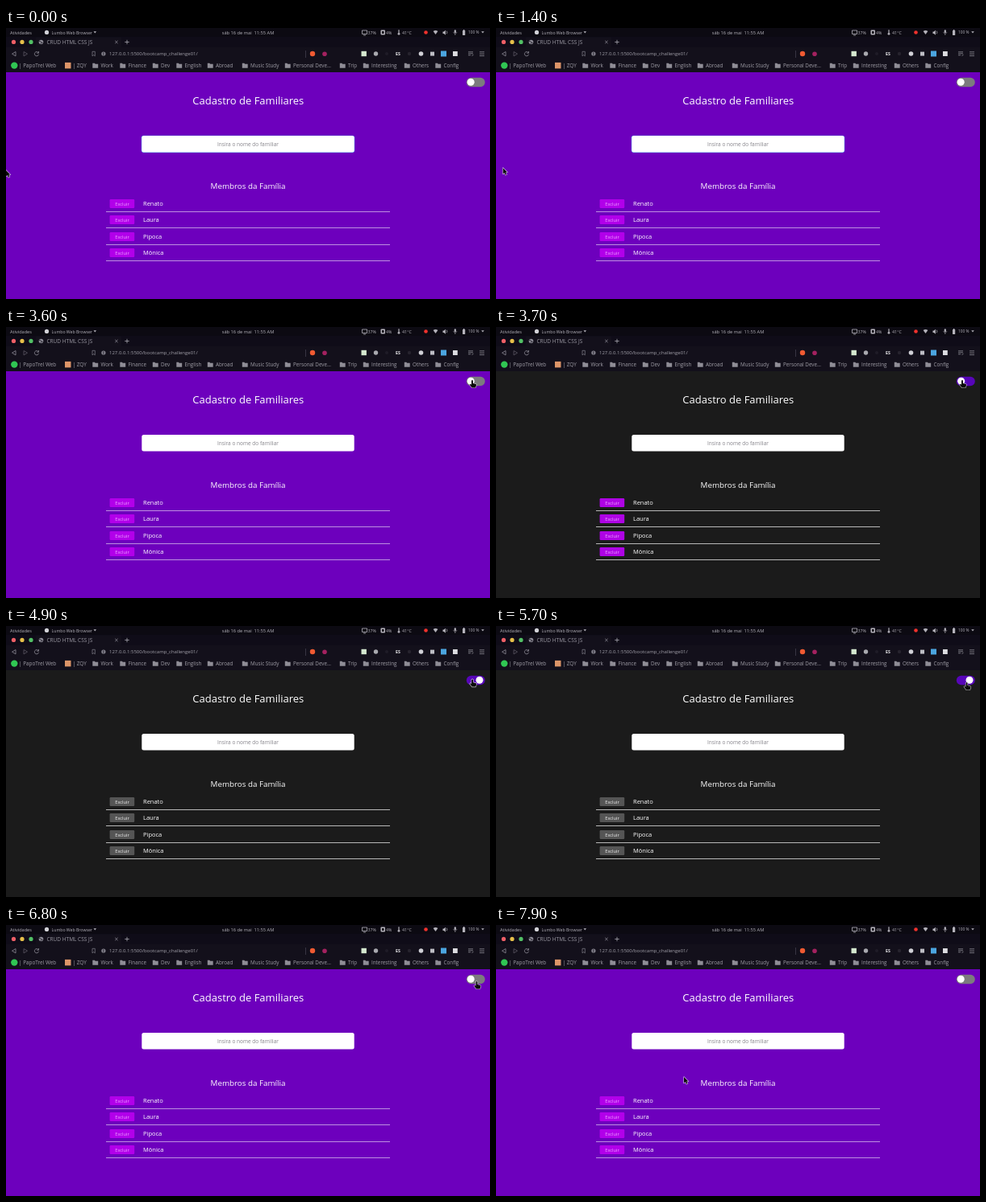
Recreate the animation shown at these times as an HTML page with a canvas. Size 600 by 337 pixels, loop 8000 ms.

```html
<!DOCTYPE html>
<html lang="pt-BR">
<head>
<meta charset="utf-8">
<title>Cadastro de Familiares</title>
<style>
html, body { margin: 0; width: 100%; height: 100%; overflow: hidden; background: #0c0a12; }
canvas { display: block; width: 600px; height: 337px; }
</style>
</head>
<body>
<canvas id="stage" width="600" height="337"></canvas>
<script>
const ctx = document.getElementById('stage').getContext('2d');
const LOOP = 8000, STEP = 100;
const DARK_FROM = 3700, DARK_TO = 6100, BLUR_AT = 3500;
const FAMILY = ['Renato', 'Laura', 'Pipoca', 'Mônica'];
const FOLDERS = [
  [108, 'Work'], [142, 'Finance'], [182.5, 'Dev'], [212, 'English'], [250.5, 'Abroad'],
  [293.5, 'Music Study'], [346.5, 'Personal Deve…'], [414.5, 'Trip'],
  [443.5, 'Interesting'], [494.5, 'Others'], [533, 'Config']
];

const linear = u => u;
const smooth = u => u * u * (3 - 2 * u);
const easeIn = u => u ** 1.5;
const easeOut = u => 1 - (1 - u) ** 1.7;
const mix = (a, b, u) => a + (b - a) * u;
const ramp = (t, from, to) => Math.min(1, Math.max(0, (t - from) / (to - from)));

// time, x, y, easing towards this point
const POINTER = [
  [0, 0, 177, linear], [1300, 0, 177, linear], [2200, 234, 95, easeIn],
  [3300, 578, 66, easeOut], [4800, 578, 66, linear], [5700, 583.5, 70, smooth],
  [7100, 583.5, 70, linear], [7900, 233, 189, smooth], [LOOP, 233, 189, linear]
];

function pointerAt(t) {
  const i = POINTER.findIndex(p => p[0] > t);
  const [t0, x0, y0] = POINTER[i - 1], [t1, x1, y1, ease] = POINTER[i];
  const u = ease(ramp(t, t0, t1));
  return [mix(x0, x1, u), mix(y0, y1, u)];
}

function text(str, x, y, size, color, { align = 'left', weight = 400 } = {}) {
  ctx.font = `${weight} ${size}px "Open Sans", sans-serif`;
  ctx.textAlign = align;
  ctx.fillStyle = color;
  ctx.fillText(str, x, y);
}

function rect(x, y, w, h, color, radius = 0) {
  ctx.fillStyle = color;
  ctx.beginPath();
  ctx.roundRect(x, y, w, h, radius);
  ctx.fill();
}

function dot(x, y, r, color) {
  ctx.fillStyle = color;
  ctx.beginPath();
  ctx.arc(x, y, r, 0, Math.PI * 2);
  ctx.fill();
}

function line(d, color = '#8f8c97', width = 0.8) {
  ctx.strokeStyle = color;
  ctx.lineWidth = width;
  ctx.stroke(new Path2D(d));
}

function shape(d, color) {
  ctx.fillStyle = color;
  ctx.fill(new Path2D(d));
}

function drawSystemBar() {
  const bar = '#0c0a12', ink = '#b5b3bb';
  rect(0, 0, 600, 11, bar);
  text('Atividades', 5, 7.5, 5.6, ink);
  dot(50.5, 5.4, 2.6, '#d2d2d8');
  text('Lumbo Web Browser', 56.5, 7.5, 5.2, ink);
  shape('M108.5 4.3h3.6l-1.8 2.3z', ink);
  text('sáb 16 de mai  11:55 AM', 300, 7.5, 5.7, ink, { align: 'center' });

  line('M441.5 3h6v4.5h-6zM443 9h3', ink);
  text('37%', 448.5, 7.5, 5.2, ink);
  rect(464.5, 2.5, 5.5, 6, ink, 1);
  rect(466, 4, 2.5, 3, bar);
  text('4%', 471, 7.5, 5.2, ink);
  line('M487 2.2v4', ink, 1.2);
  dot(487, 7.3, 1.4, ink);
  text('41°C', 491, 7.5, 5.4, ink);
  dot(520.5, 5.5, 2.3, '#f0322d');
  shape('M529.6 4q2.9-2 5.8 0l-2.9 4z', ink);
  shape('M541.5 4.4h1.4l2-1.7v6l-2-1.7h-1.4z', ink);
  line('M546.2 3.7q1.4 1.8 0 3.6', ink, 0.7);
  rect(555.7, 2.3, 2.2, 4, ink, 1.1);
  line('M554.6 5.2q2.2 4 4.4 0M556.8 7.2v1.8', ink, 0.6);
  rect(566, 3, 3.2, 6, ink, 0.5);
  rect(566.9, 2, 1.4, 1, ink);
  text('100 %', 573, 7.3, 4.8, ink);
  shape('M589.2 4.3h3.6l-1.8 2.3z', ink);
}

function drawTabs() {
  rect(0, 11, 600, 13, '#0f0c18');
  rect(37, 11.5, 106, 13, '#13101b', 1);
  dot(9.5, 17.4, 2.6, '#ee5f66');
  dot(20, 17.4, 2.6, '#e6c04a');
  dot(31, 17.4, 2.6, '#52c065');
  dot(43.5, 17.5, 2.8, '#8f8d98');
  line('M41 16.6h2l1 1.4 1.8.5M43 19.9l1-2', '#13101b', 0.7);
  text('CRUD HTML CSS JS', 50.5, 19.8, 6.5, '#9a98a2');
  line('M135.2 15.8l3.4 3.4m0-3.4l-3.4 3.4');
  line('M147.3 17.5h5.4M150 14.8v5.4', '#a9a7b0');
}

function drawToolbar() {
  const grey = '#85838d', pale = '#a19fa8';
  rect(0, 24, 600, 31, '#13101b');
  line('M12 29.5v5.4L7.5 32.2z');
  line('M22 29.5v5.4l4.5-2.7z', '#5d5a65');
  line('M40 30.6a2.6 2.6 0 1 0 .5 2.2M40.5 29v2.2h-2.2');
  line('M107 29.3h3.3v5.6l-1.65-1.4L107 34.9z', grey, 0.7);
  dot(120.9, 32, 2.6, grey);
  rect(120.5, 30.3, 0.8, 3.4, '#13101b');
  text('127.0.0.1:5500/bootcamp_challenge01/', 128, 34.3, 6, '#a3a1aa');
  line('M371.5 28v9', '#4a4753', 0.7);
  dot(380, 32, 3.2, '#f05a32');
  dot(395, 32.3, 2.8, '#a3215f');

  rect(440.5, 28.8, 6.4, 6.4, '#d5e8cf');
  dot(458.5, 32, 2.7, '#a9a9af');
  dot(472, 32, 2, '#1f1c27');
  text('ES', 486, 34, 5.2, '#f4f4f6', { align: 'center', weight: 700 });
  dot(500, 32, 2.2, '#26232e');
  dot(514.5, 32, 2.8, '#d0d0d6');
  rect(526, 29.6, 5, 5, '#bdbdc4');
  rect(539, 28.5, 7, 7, '#4ba5df');
  rect(554, 29, 5.8, 6, '#dcdce0');
  line('M573 29.8h6M573 31.8h6M573 33.8h3M577.5 34.5l2-1.2', pale, 0.7);
  line('M587 29.8h6M587 32.2h6M587 34.6h6', pale, 0.7);
}

function drawBookmarks() {
  const ink = '#a09ea7';
  dot(10.3, 46.6, 4.2, '#30c653');
  text('| PapoTrel Web', 16, 49.1, 6.4, ink);
  rect(73, 42.9, 7.5, 7.5, '#dd9568');
  text('| ZQY', 82.5, 49.1, 6.4, ink);
  for (const [x, label] of FOLDERS) {
    shape(`M${x - 0.7} 43.8h2.6l.8 1h3.5v4.9h-6.9z`, '#8f8d96');
    text(label, x + 9.5, 49.1, 6.3, ink);
  }
}

function drawToggle(dark, pos) {
  rect(570.8, 61.8, 23, 11.4, dark ? '#5706b8' : '#7c7b7e', 5.7);
  dot(mix(576.2, 587, pos), 67.3, 4.5, '#ffffff');
}

function buttonColor(t, pos) {
  if (t >= DARK_TO && pos > 0.8) return '#64186c';
  const [r, g, b] = [[178, 85], [0, 85], [234, 85]].map(([a, z]) => Math.round(mix(a, z, pos)));
  return `rgb(${r},${g},${b})`;
}

function drawPage(t) {
  const dark = t >= DARK_FROM && t < DARK_TO;
  const pos = smooth(ramp(t, 3650, 4050)) - smooth(ramp(t, 6000, 6400));
  rect(0, 55, 600, 282, dark ? '#1b1b1b' : '#6d00bd');
  drawToggle(dark, pos);
  text('Cadastro de Familiares', 300.3, 95.3, 13, '#ffffff', { align: 'center', weight: 500 });

  const focused = t < BLUR_AT;
  if (focused) rect(167.8, 133.7, 264.4, 21.2, '#59a9ee', 2.8);
  rect(168.3, 134.1, 263.4, 20.4, '#ffffff', 2.5);
  text('Insira o nome do familiar', 300, 147, 6.5, '#85838a', { align: 'center' });
  const caretOn = focused && t >= 500 && Math.floor((t - 500) / 600) % 2 === 0;
  if (caretOn) rect(300.5, 140.5, 0.8, 8, '#222222');

  text('Membros da Família', 300, 199.6, 9.8, '#ffffff', { align: 'center', weight: 500 });
  const fill = buttonColor(t, pos);
  const label = pos > 0.4 ? '#f0f0f0' : '#eca6ff';
  FAMILY.forEach((name, i) => {
    const y = Math.round(213.2 + i * 20.2);
    rect(128.6, y, 30.6, 11, fill, 1.2);
    text('Excluir', 144, y + 7.6, 5.7, label, { align: 'center' });
    text(name, 170, y + 7.7, 7.5, '#ffffff');
    rect(124, y + 15, 352, 1, dark ? '#b8b8b8' : '#bd8fe0');
  });
}

function drawPointer(t) {
  const [x, y] = pointerAt(t);
  const overToggle = x > 570 && x < 594 && y > 61 && y < 74;
  const path = new Path2D(overToggle
    ? 'M-1 .8Q0-.8 1 .8V4L4.4 5Q5.3 5.3 5 6.3L4 9.4H-.4L-3.2 5.7Q-2.8 4.5-1 5.6Z'
    : 'M0 0V7.5L1.8 6L3.1 8.8L4.4 8.2L3.2 5.5H5.4Z');
  ctx.save();
  ctx.translate(x, y);
  ctx.lineJoin = 'round';
  ctx.lineWidth = 1.2;
  ctx.strokeStyle = 'rgba(255,255,255,.75)';
  ctx.stroke(path);
  ctx.fillStyle = '#0a0a0a';
  ctx.fill(path);
  ctx.restore();
}

const start = performance.now();

function frame(now) {
  const elapsed = Math.max(0, now - start) % LOOP;
  const t = Math.floor(elapsed / STEP) * STEP;
  drawSystemBar();
  drawTabs();
  drawToolbar();
  drawBookmarks();
  drawPage(t);
  drawPointer(t);
  requestAnimationFrame(frame);
}

frame(start);
</script>
</body>
</html>
```
